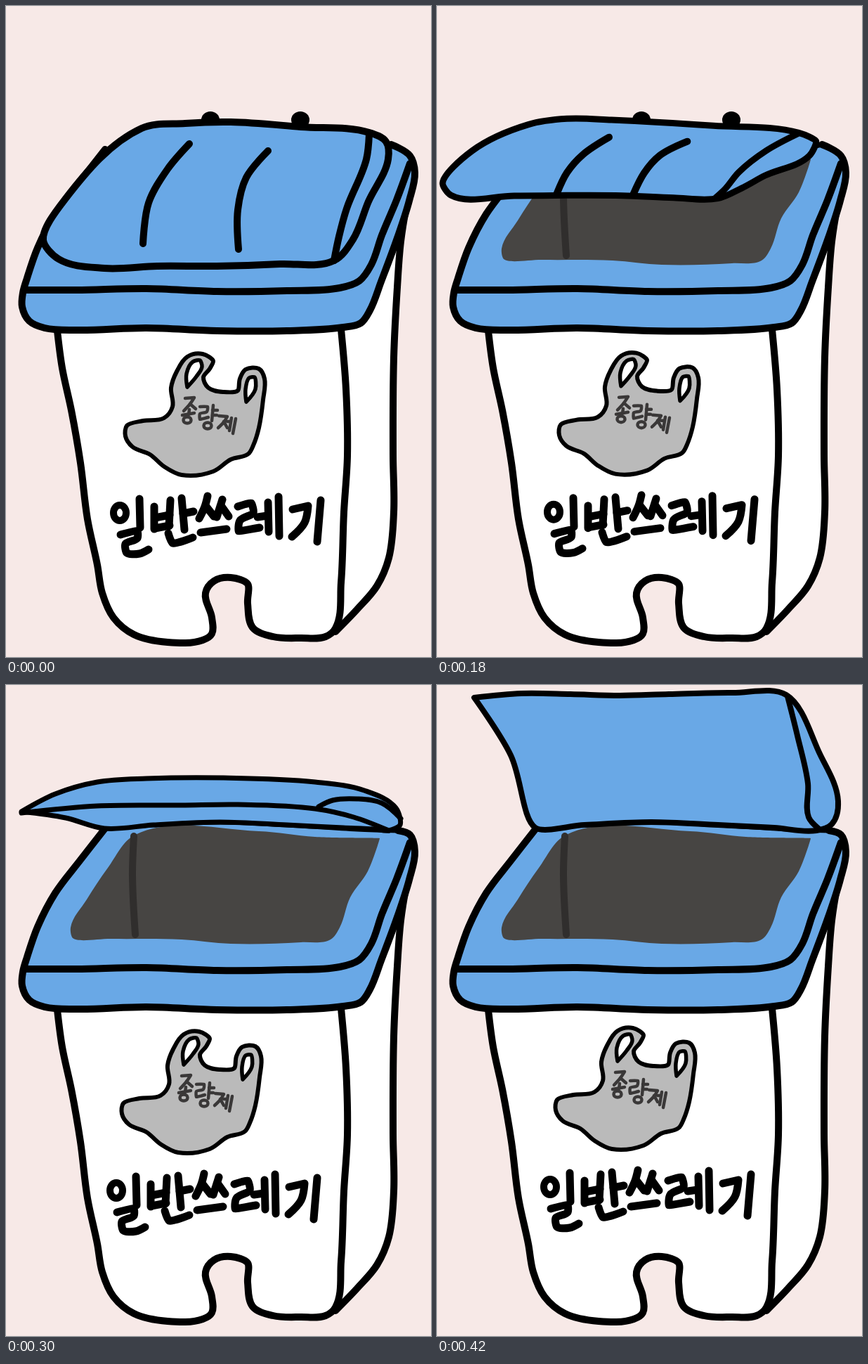
An HTML page with a canvas for the animation above (450 ms loop, 605x926 px).

```html
<!DOCTYPE html>
<html lang="ko">
<head>
<meta charset="utf-8">
<title>일반쓰레기</title>
<style>
html, body { margin: 0; width: 605px; height: 926px; overflow: hidden; background: #f7e9e7; }
canvas { display: block; }
</style>
</head>
<body>
<canvas id="stage" width="605" height="926" role="img" aria-label="일반쓰레기 종량제"></canvas>
<script>
const ctx = document.getElementById('stage').getContext('2d');
const PAPER = '#f7e9e7', BLUE = '#69a8e6', DARK = '#474543', INK = '#000', GREY = '#bababa';
const STEP = 30, STEPS = 15;

const points = text => text.split(' ').map(pair => pair.split(',').map(Number));

// Smooth curve through the points; sharp turns stay sharp.
function trace(list, closed) {
  const n = list.length;
  const at = i => closed ? list[(i + n) % n] : list[Math.max(0, Math.min(n - 1, i))];
  const tangent = i => {
    const [a, b, c] = [at(i - 1), at(i), at(i + 1)];
    const inLen = Math.hypot(b[0] - a[0], b[1] - a[1]);
    const outLen = Math.hypot(c[0] - b[0], c[1] - b[1]);
    if (!inLen || !outLen) return [0, 0];
    const u = [(b[0] - a[0]) / inLen, (b[1] - a[1]) / inLen];
    const v = [(c[0] - b[0]) / outLen, (c[1] - b[1]) / outLen];
    const bend = u[0] * v[0] + u[1] * v[1];
    const k = Math.min(1, Math.max(0, bend + 0.35));
    const len = Math.hypot(u[0] + v[0], u[1] + v[1]) || 1;
    return [(u[0] + v[0]) / len * k, (u[1] + v[1]) / len * k];
  };
  ctx.beginPath();
  ctx.moveTo(...list[0]);
  for (let i = 0; i < (closed ? n : n - 1); i++) {
    const p = at(i), q = at(i + 1), s = tangent(i), e = tangent(i + 1);
    const d = Math.hypot(q[0] - p[0], q[1] - p[1]) / 3;
    ctx.bezierCurveTo(p[0] + s[0] * d, p[1] + s[1] * d, q[0] - e[0] * d, q[1] - e[1] * d, ...q);
  }
  if (closed) ctx.closePath();
}

function line(list, width = 10, color = INK) {
  trace(list, false);
  ctx.lineWidth = width;
  ctx.strokeStyle = color;
  ctx.stroke();
}

function shape(list, fill, width = 0) {
  trace(list, true);
  ctx.fillStyle = fill;
  ctx.fill();
  if (!width) return;
  ctx.lineWidth = width;
  ctx.strokeStyle = INK;
  ctx.stroke();
}

function ring(x, y, rx, ry, width, color) {
  ctx.beginPath();
  ctx.ellipse(x, y, rx, ry, 0, 0, Math.PI * 2);
  ctx.lineWidth = width;
  ctx.strokeStyle = color;
  ctx.stroke();
}

const bodyFront = points('73,462 80,515 93,575 106,650 116,730 130,795 137,835 153,870 182,894 230,905 280,902 293,893 293,870 284,835 296,818 320,813 344,822 344,850 351,884 380,897 420,899 455,897 469,885 477,820 481,720 486,640 484,545 477,460');
const bodySide = points('469,890 500,858 528,825 545,785 552,720 551,640 552,500 557,400 562,335 570,285 580,240');
const rimBase = points('141,204 105,250 70,296 45,344 30,387 24,408 23,428 33,448 55,458 100,461 200,458 300,462 400,462 480,457 505,451 518,433 534,392 557,330 574,277 582,237 575,213');
const rimFold = points('26,404 100,404 200,402 300,406 400,405 475,401 503,391 520,368 535,326 556,276 575,224');
const rimBack = points('141,204 210,199 305,195 400,199 500,205');
const inside = points('184,213 360,208 440,216 532,218 515,265 490,302 475,345 462,362 420,366 320,368 250,362 150,361 95,360 92,345 115,305 145,260');
const crack = points('486,307 488,315 478,345 465,365 450,369 446,362 465,330');
const insideEdge = points('182,215 180,270 184,355');

const pose = (step, width, outline, seam, ribA, ribB, front) => ({
  step, width, outline: points(outline), seam: points(seam),
  ribs: [points(ribA), points(ribB)], front: points(front)
});
const closedRibs = ['261,196 230,232 203,280 195,338', '373,206 342,244 330,290 331,346'];
const raisedRibs = ['250,140 215,150 200,160 190,170', '355,140 318,150 302,160 290,170'];
const lowFront = '20,242 110,242 190,242 260,242 330,245 390,245 530,213';
const highFront = '22,121 120,110 200,110 310,106 400,112 465,113 530,206';
const hinge = '480,203 400,199 305,195 210,199 ';

const poses = [
  pose(0, 10,
    '53,333 84,275 193,174 255,167 320,165 420,172 517,180 541,193 544,218 516,278 494,332 467,362 390,367 300,370 215,370 140,373 75,360',
    '517,182 513,218 485,288 474,328 467,362', ...closedRibs, lowFront),
  pose(2, 10,
    '43,325 75,263 183,176 245,166 310,164 420,172 517,180 537,193 535,214 498,277 465,328 438,365 370,363 280,362 200,360 130,359 62,353',
    '517,183 500,222 466,285 451,322 438,362', ...closedRibs, lowFront),
  pose(4, 9,
    '8,300 60,232 170,180 235,167 305,164 420,171 515,179 539,191 530,213 480,272 450,306 420,331 350,328 270,325 190,324 110,326 20,324',
    '515,182 485,218 458,268 441,308 420,330',
    '249,194 212,235 185,275 166,320', '373,206 340,235 315,272 297,322', lowFront),
  pose(7, 9,
    '8,228 45,193 110,163 160,157 220,161 380,170 515,181 540,193 530,213 460,226 425,236 390,245 330,245 260,242 190,242 110,242 20,242',
    '512,182 460,200 415,221 395,236 385,244',
    '243,183 205,200 185,218 173,240', '348,186 305,202 285,220 271,240', lowFront),
  pose(10, 7,
    '22,180 70,155 130,138 200,133 310,132 440,138 510,150 555,175 561,199 545,207 525,205 ' + hinge + '140,204 85,189',
    '562,190 535,168 500,162 465,164 445,173', ...raisedRibs,
    '22,182 130,172 250,171 330,170 440,176 495,188 545,207'),
  pose(12, 8,
    '22,121 60,115 120,110 200,110 310,106 400,112 482,113 530,132 575,187 562,200 530,206 ' + hinge + '140,205 92,155',
    '530,204 515,168 500,143 485,125 465,113', ...raisedRibs, highFront),
  pose(14, 8,
    '53,18 120,12 190,13 260,15 330,13 420,11 497,14 545,98 571,165 562,198 540,207 ' + hinge + '140,203 105,100',
    '543,204 529,188 528,140 513,72 499,16', ...raisedRibs, highFront)
];
const labelShift = points('0,0 -2,-7 4,-2 4,-1 -5,-2 -3,0 -1,-7');

const bag = points('235,543 243,520 258,499 280,495 295,505 290,516 281,528 288,543 310,549 330,547 333,530 341,517 360,516 368,530 366,560 360,600 352,625 345,637 320,645 295,662 250,667 225,655 205,638 180,627 170,612 172,597 195,590 225,586 237,570');
const handles = ['258,542 257,523 266,506 276,504 279,513 271,527', '342,563 341,545 346,529 354,528 355,545'].map(points);
const title = [
  '190,701 191,742', '163,752 187,746 187,757 170,765 172,778 190,779 203,773',
  '211,712 211,744', '234,703 232,740', '212,728 233,724', '212,743 233,739',
  '250,700 254,745', '252,722 267,719', '231,750 237,764 266,756',
  '287,697 283,712 275,729', '285,712 296,726', '308,702 300,727', '307,712 317,726', '277,749 314,744',
  '330,712 349,707 352,721 333,732 331,747 361,742', '358,727 372,725', '373,706 374,748', '388,698 389,754',
  '408,716 430,711 425,735 407,755', '448,703 443,762'
].map(points);
const bagText = [
  '255,558 268,557 262,566 253,576', '262,566 270,573', '261,574 260,581', '251,582 268,579',
  '276,570 287,570 286,577 276,580 276,588 288,585', '295,568 293,590', '294,575 301,575', '294,582 300,582',
  '303,583 315,584 310,592 302,600', '310,591 315,600', '315,591 320,591', '321,586 318,604', '327,587 323,608'
].map(points);

const mix = (a, b, k) => a + (b - a) * k;
const mixPoints = (a, b, k) => a.map((p, i) => [mix(p[0], b[i][0], k), mix(p[1], b[i][1], k)]);

function drawBin(step) {
  ctx.fillStyle = INK;
  for (const x of [291, 419]) {
    ctx.beginPath();
    ctx.ellipse(x, 162, 13, 12, 0, 0, Math.PI * 2);
    ctx.fill();
  }
  shape([...bodySide, [477, 460]], '#fff');
  shape(bodyFront, '#fff');
  line(bodySide);
  line(bodyFront);

  const corner = step < 9 ? [548, 197] : [558, 207];
  shape([...rimBase, corner, ...rimBack.slice().reverse()], BLUE);
  line([...rimBase, corner]);
  line([...rimBack, corner], 7);
  line(rimFold);

  if (step > 2) {
    shape(inside, DARK);
    if (step > 4) line(insideEdge, 10, '#302e2d');
  } else if (step > 0) {
    shape(crack, DARK);
  }
}

function drawLid(step, from, to, k) {
  const width = mix(from.width, to.width, k);
  shape(mixPoints(from.outline, to.outline, k), BLUE, width);
  line(mixPoints(from.seam, to.seam, k), width);
  if (step < 9) from.ribs.forEach((rib, i) => line(mixPoints(rib, to.ribs[i], k)));
  if (step > 7 && step < 12) line(mixPoints(from.front, to.front, k), width);
}

function drawLabel(x, y) {
  ctx.save();
  ctx.translate(x, y);
  shape(bag, GREY, 6);
  handles.forEach(h => shape(h, '#fff', 5.5));
  const soft = '#3a3838';
  bagText.forEach(s => line(s, 4.5, soft));
  ring(258, 589, 5.5, 4.5, 4.5, soft);
  ring(287, 597, 5.5, 4.5, 4.5, soft);
  title.forEach(s => line(s, 11));
  ring(162, 721, 9, 11, 10, INK);
  ctx.restore();
}

function draw(step) {
  const i = Math.max(1, poses.findIndex(p => p.step >= step));
  const from = poses[i - 1], to = poses[i];
  const k = (step - from.step) / (to.step - from.step);
  ctx.fillStyle = PAPER;
  ctx.fillRect(0, 0, 605, 926);
  ctx.lineCap = ctx.lineJoin = 'round';
  drawBin(step);
  drawLid(step, from, to, k);
  drawLabel(...mixPoints([labelShift[i - 1]], [labelShift[i]], k)[0]);
}

const start = performance.now();
function tick() {
  draw(Math.floor(Math.max(0, performance.now() - start) / STEP) % STEPS);
  requestAnimationFrame(tick);
}
tick();
</script>
</body>
</html>
```
